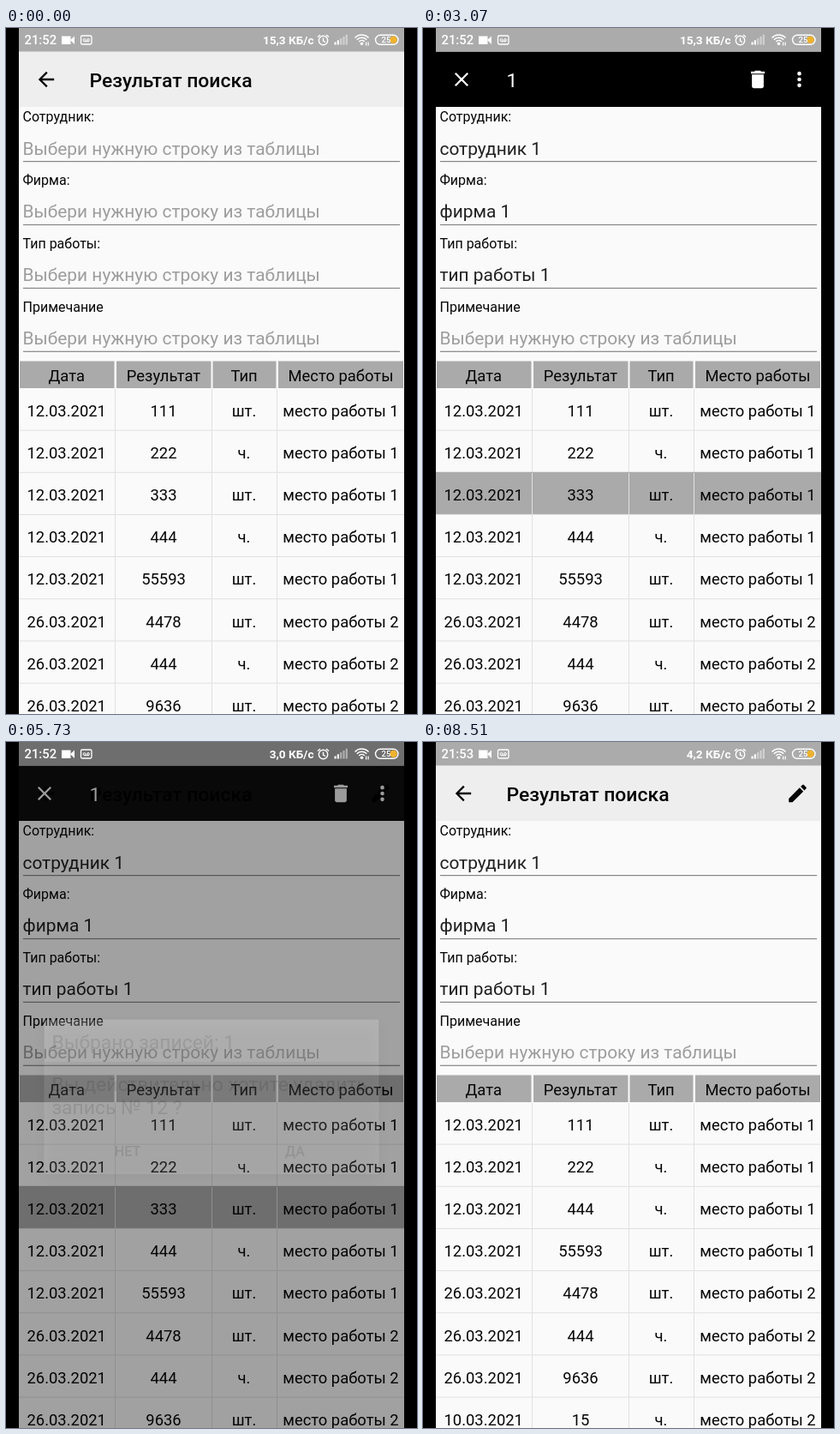
These frames come from a looping animation (480 px wide and 800 px high, 8.55 s). An HTML page with a canvas:

```html
<!DOCTYPE html>
<html lang="ru">
<head>
<meta charset="utf-8">
<title>Результат поиска</title>
<style>
  html, body { margin: 0; width: 100%; height: 100%; overflow: hidden; background: #000; }
  canvas { display: block; width: 480px; height: 800px; }
</style>
</head>
<body>
<canvas id="stage" width="480" height="800"></canvas>
<script>
const ctx = document.getElementById('stage').getContext('2d');
const LOOP = 8550;
const DP = 1.145;
const FONT = 'Roboto, "Noto Sans", sans-serif';

// Key moments in ms
const PRESS = 1330, SELECT = 1830, ASK = 3500, CONFIRM = 5650, LEAVE = 5722, REMOVE = 5750, SLIDE = 5822;

const COLORS = {
  page: '#fafafa',
  bar: '#eeeeee',
  status: '#ababab',
  header: '#aaaaaa',
  gap: '#fafafa',
  line: '#e0e0e0',
  rule: '#858585',
  hint: '#9d9d9d',
  entry: '#202020',
  ink: '#060606',
  pressed: '#ededed',
  light: '#ffffff'
};

const ICONS = {
  back: new Path2D('M20 11H7.83l5.59-5.59L12 4l-8 8 8 8 1.41-1.41L7.83 13H20z'),
  close: new Path2D('M19 6.41 17.59 5 12 10.59 6.41 5 5 6.41 10.59 12 5 17.59 6.41 19 12 13.41 17.59 19 19 17.59 13.41 12z'),
  trash: new Path2D('M6 19c0 1.1.9 2 2 2h8c1.1 0 2-.9 2-2V7H6zM19 4h-3.5l-1-1h-5l-1 1H5v2h14z'),
  pencil: new Path2D('M3 17.25V21h3.75L17.81 9.94l-3.75-3.75zM20.71 7.04c.39-.39.39-1.02 0-1.41l-2.34-2.34c-.39-.39-1.02-.39-1.41 0l-1.83 1.83 3.75 3.75z'),
  dots: new Path2D('M14 6a2 2 0 1 1-4 0 2 2 0 0 1 4 0zM14 12a2 2 0 1 1-4 0 2 2 0 0 1 4 0zM14 18a2 2 0 1 1-4 0 2 2 0 0 1 4 0z')
};

const FIELDS = [
  ['Сотрудник:', 'сотрудник 1'],
  ['Фирма:', 'фирма 1'],
  ['Тип работы:', 'тип работы 1'],
  ['Примечание', '']
];
const HINT = 'Выбери нужную строку из таблицы';

const COLUMNS = [
  { title: 'Дата', left: 16, right: 126.5, mid: 70.7 },
  { title: 'Результат', left: 129, right: 239.5, mid: 184 },
  { title: 'Тип', left: 241.5, right: 315.5, mid: 278 },
  { title: 'Место работы', left: 318, right: 464, mid: 391 }
];
const DIVIDERS = [127.5, 240.5, 316.5];

const ROWS = [
  ['12.03.2021', '111', 'шт.', 1],
  ['12.03.2021', '222', 'ч.', 1],
  ['12.03.2021', '333', 'шт.', 1],
  ['12.03.2021', '444', 'ч.', 1],
  ['12.03.2021', '55593', 'шт.', 1],
  ['26.03.2021', '4478', 'шт.', 2],
  ['26.03.2021', '444', 'ч.', 2],
  ['26.03.2021', '9636', 'шт.', 2],
  ['10.03.2021', '15', 'ч.', 2]
];
const CHOSEN = 2, ROW_TOP = 420.5, ROW_H = 49.15;

const ramp = (t, start, length) => Math.min(1, Math.max(0, (t - start) / length));
const ease = p => (1 - Math.cos(Math.PI * p)) / 2;

function box(x, y, w, h, color) {
  ctx.fillStyle = color;
  ctx.fillRect(x, y, w, h);
}

function text(str, x, y, size, color, { weight = 400, align = 'left' } = {}) {
  ctx.font = `${weight} ${size}px ${FONT}`;
  ctx.textAlign = align;
  ctx.fillStyle = color;
  ctx.fillText(str, x, y);
}

function icon(name, cx, cy, color) {
  ctx.save();
  ctx.translate(cx, cy);
  ctx.scale(DP, DP);
  ctx.translate(-12, -12);
  ctx.fillStyle = color;
  ctx.fill(ICONS[name]);
  ctx.restore();
}

function faded(alpha, draw) {
  if (alpha <= 0) return;
  ctx.save();
  ctx.globalAlpha = alpha;
  draw();
  ctx.restore();
}

function stroke(width, color, build) {
  ctx.lineWidth = width;
  ctx.strokeStyle = color;
  ctx.beginPath();
  build();
  ctx.stroke();
}

function drawStatusIcons(t) {
  const color = COLORS.light;
  const speed = t < 4700 ? '15,3' : t < 7000 ? '3,0' : '4,2';
  text(t < 5800 ? '21:52' : '21:53', 21.5, 19, 14.8, color, { weight: 500 });
  text(speed + ' КБ/с', 359.5, 18.7, 13.6, color, { weight: 700, align: 'right' });

  // Video camera
  box(65, 9.5, 10.5, 9.5, color);
  ctx.beginPath();
  ctx.moveTo(75, 14);
  ctx.lineTo(80, 9.5);
  ctx.lineTo(80, 19);
  ctx.fill();

  // Recorder
  stroke(1.3, color, () => ctx.roundRect(87.5, 9, 12.5, 10, 1.5));
  stroke(1, color, () => {
    ctx.arc(91.5, 14, 1.4, 0, 7);
    ctx.moveTo(97.4, 14);
    ctx.arc(96, 14, 1.4, 0, 7);
    ctx.moveTo(91, 15.7);
    ctx.lineTo(97, 15.7);
  });

  // Alarm clock
  stroke(1.4, color, () => {
    ctx.arc(370.5, 14.5, 5.2, 0, 7);
    ctx.moveTo(370.5, 11.5);
    ctx.lineTo(370.5, 15);
    ctx.lineTo(373, 16.5);
    ctx.moveTo(364, 10.5);
    ctx.lineTo(367, 8);
    ctx.moveTo(377, 10.5);
    ctx.lineTo(374, 8);
  });

  // Signal strength
  for (let i = 0; i < 5; i++) {
    const h = 3 + i * 2.2;
    faded(i < 2 ? 1 : 0.45, () => box(383.5 + i * 3.3, 19.5 - h, 2.2, h, color));
  }

  // Wi-Fi with traffic marks
  for (const r of [4.5, 7.8, 11]) {
    stroke(1.5, color, () => ctx.arc(415.5, 19, r, -Math.PI * 0.76, -Math.PI * 0.24));
  }
  ctx.fillStyle = color;
  ctx.beginPath();
  ctx.arc(415.5, 18.2, 1.8, 0, 7);
  ctx.fill();
  box(420, 16.5, 1.2, 4, color);
  box(422.5, 16.5, 1.2, 4, color);

  // Battery
  ctx.fillStyle = '#eeb32e';
  ctx.beginPath();
  ctx.arc(452.5, 13.8, 4.3, 0, 7);
  ctx.fill();
  stroke(1.4, color, () => ctx.roundRect(431.5, 8.3, 26.5, 11, 5.5));
  text('25', 444, 17.4, 9.5, color, { weight: 500, align: 'center' });
}

function drawToolbar(t) {
  box(15, 27.5, 450, 64.5, COLORS.bar);
  icon('back', 47, 60, COLORS.ink);
  text('Результат поиска', 97.5, 69, 22.9, COLORS.ink, { weight: 500 });
  if (t >= SELECT) icon('pencil', 437.5, 60, COLORS.ink);

  faded(ramp(t, SELECT, 180) * (1 - ramp(t, LEAVE, 150)), () => {
    box(15, 27.5, 450, 64.5, '#000');
    icon('close', 45, 60, COLORS.light);
    text('1', 97.5, 69, 22.9, COLORS.light);
    icon('trash', 391, 60, COLORS.light);
    icon('dots', 439.5, 60, COLORS.light);
  });
}

function drawFields(t) {
  FIELDS.forEach(([label, value], i) => {
    const y = i * 73.9;
    const filled = t >= SELECT && value;
    text(label, 19.5, 109.3 + y, 16, COLORS.ink);
    text(filled ? value : HINT, 19.5, 147.5 + y, 20.9, filled ? COLORS.entry : COLORS.hint);
    box(20, 155 + y, 440, 1.2, COLORS.rule);
  });
}

function drawRow(row, top, fill) {
  if (fill) box(15, top - 1, 450, ROW_H, fill);
  for (const x of DIVIDERS) box(x - 0.5, top, 1, ROW_H, COLORS.line);
  box(15, top + ROW_H - 1, 450, 1, COLORS.line);
  row.forEach((cell, i) => {
    const label = i === 3 ? 'место работы ' + cell : cell;
    text(label, COLUMNS[i].mid, top + 32.3, 18.4, COLORS.ink, { align: 'center' });
  });
}

function drawTable(t) {
  const slide = ease(ramp(t, SLIDE, 250)) * ROW_H;
  ROWS.forEach((row, i) => {
    const top = ROW_TOP + i * ROW_H - (i > CHOSEN ? slide : 0);
    if (i !== CHOSEN) return drawRow(row, top);
    const fill = t >= SELECT ? COLORS.header : t >= PRESS ? COLORS.pressed : null;
    faded(1 - ramp(t, REMOVE, SLIDE - REMOVE), () => drawRow(row, top, fill));
  });
  box(15, 387, 450, 33.5, COLORS.gap);
  for (const { title, left, right, mid } of COLUMNS) {
    box(left, 388.5, right - left, 31.5, COLORS.header);
    text(title, mid, 411.5, 18.4, COLORS.ink, { align: 'center' });
  }
}

function drawDialog(t) {
  faded(ramp(t, ASK, 150) * (1 - ramp(t, CONFIRM, 91)), () => {
    ctx.save();
    ctx.shadowColor = 'rgba(0,0,0,.4)';
    ctx.shadowBlur = 16;
    ctx.shadowOffsetY = 6;
    ctx.fillStyle = '#fff';
    ctx.beginPath();
    ctx.roundRect(44.5, 323.5, 391, 180.5, 2.5);
    ctx.fill();
    ctx.restore();
    box(45, 324, 390, 49, COLORS.bar);
    text('Выбрано записей: 1', 53.5, 357.5, 22.9, COLORS.ink);
    text('Вы действительно хотите удалить', 53.5, 406.5, 22.9, COLORS.ink);
    text('запись № 12 ?', 53.5, 433.5, 22.9, COLORS.ink);
    text('НЕТ', 142, 482.7, 16, COLORS.ink, { weight: 500, align: 'center' });
    text('ДА', 337.5, 482.7, 16, COLORS.ink, { weight: 500, align: 'center' });
  });
}

function draw(t) {
  const dim = ramp(t, ASK, 200) * (1 - ramp(t, CONFIRM, 200));
  box(0, 0, 480, 800, '#000');
  box(15, 0, 450, 800, COLORS.page);
  drawTable(t);
  drawFields(t);
  drawToolbar(t);
  box(15, 0, 450, 27.5, COLORS.status);
  faded(dim * 0.6, () => box(15, 0, 450, 800, '#000'));
  drawStatusIcons(t);
  drawDialog(t);
}

const begin = performance.now();
function tick() {
  draw((performance.now() - begin) % LOOP);
  requestAnimationFrame(tick);
}
tick();
</script>
</body>
</html>
```
